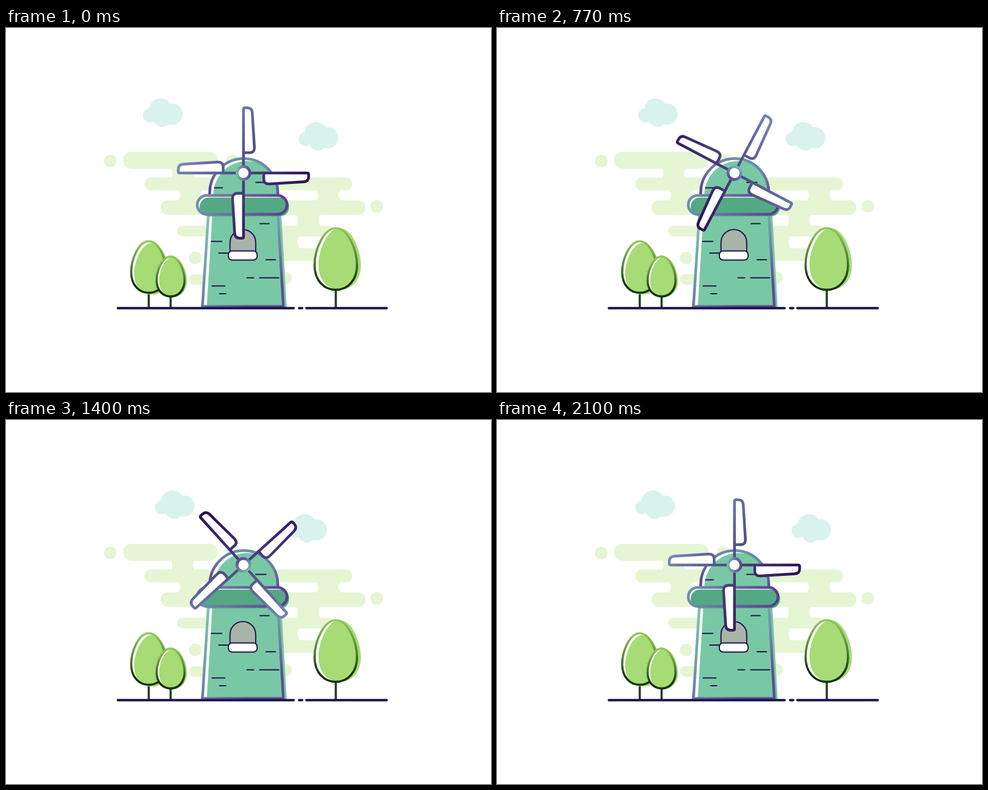
These frames come from a looping animation (800 px wide and 600 px high, 2170 ms). An HTML page:

```html
<!DOCTYPE html>
<html lang="en">
<head>
<meta charset="utf-8">
<title>Windmill</title>
<style>
  html, body { margin: 0; width: 100%; height: 100%; overflow: hidden; background: #fff; }
  svg { display: block; width: 800px; height: 600px; }
</style>
</head>
<body>
<svg viewBox="0 0 800 600" fill="none">
  <defs id="defs">
    <linearGradient id="leaf" x1="0" y1="0" x2="0" y2="1">
      <stop stop-color="#94c957"/><stop offset=".5" stop-color="#527d35"/><stop offset=".85" stop-color="#15330f"/>
    </linearGradient>
    <linearGradient id="wall" gradientUnits="userSpaceOnUse" x1="345" y1="300" x2="450" y2="459">
      <stop stop-color="#7cc6a8"/><stop offset=".36" stop-color="#73a3ac"/>
      <stop offset=".6" stop-color="#6c7cac"/><stop offset=".85" stop-color="#5f4a98"/>
    </linearGradient>
    <linearGradient id="arch" gradientUnits="userSpaceOnUse" x1="400" y1="214" x2="392" y2="276">
      <stop stop-color="#6f8fac"/><stop offset=".4" stop-color="#6b78a8"/><stop offset="1" stop-color="#5c4094"/>
    </linearGradient>
    <linearGradient id="rim" gradientUnits="userSpaceOnUse" x1="315" y1="284" x2="463" y2="300">
      <stop stop-color="#7190ae"/><stop offset="1" stop-color="#5c3a90"/>
    </linearGradient>
    <linearGradient id="ring" gradientUnits="userSpaceOnUse" x1="-12" y1="0" x2="12" y2="0">
      <stop stop-color="#78b6ae"/><stop offset="1" stop-color="#5e4296"/>
    </linearGradient>
    <linearGradient id="sail" gradientUnits="userSpaceOnUse" x1="-84" y1="-68" x2="72" y2="58">
      <stop stop-color="#7d95bd"/><stop offset=".5" stop-color="#4e4a82"/><stop offset="1" stop-color="#2a0d52"/>
    </linearGradient>
    <path id="dome" d="M336 278V271.500A56.200 56.200 0 0 1 448.400 271.500V278"/>
    <clipPath id="domeClip"><use href="#dome"/></clipPath>
    <path id="neck" d="M-20.500 -10Q-13.500 0 -20.500 10H20.500Q13.500 0 20.500 -10Z"/>
    <g id="cloud" fill="#daf2ee">
      <circle cx="255" cy="135" r="19"/><circle cx="274" cy="142" r="17.5"/>
      <circle cx="237.5" cy="144" r="11.5"/><circle cx="258" cy="148" r="15"/>
    </g>
  </defs>

  <!-- haze: round strokes joined by necks -->
  <g fill="#e6f5d3">
    <g stroke="#e6f5d3" stroke-linecap="round">
      <path stroke-width="28" d="M207 218H335"/>
      <path stroke-width="24" d="M267 296H581"/>
      <path stroke-width="21" d="M238.500 257H560.500M430 373.500H520M172 219h0M373 219h0M611.500 294h0M312 379h0M461 412h0"/>
      <path stroke-width="17.500" d="M291 334.700H530M310.500 414.500H400"/>
    </g>
    <use href="#neck" x="291.5" y="239.5"/>
    <use href="#neck" x="304" y="275.5"/>
    <use href="#neck" x="531.5" y="275.5"/>
    <use href="#neck" x="498.5" y="317"/>
    <path d="M440 342H484Q478 353 484 364H440Z"/>
  </g>
  <use id="cloudA" href="#cloud"/>
  <use id="cloudB" href="#cloud" y="39"/>
  <g id="trees"></g>

  <!-- dome -->
  <g clip-path="url(#domeClip)">
    <use href="#dome" fill="#fff"/>
    <use href="#dome" fill="#79c8a5" x="6" y="4"/>
  </g>
  <use href="#dome" stroke="url(#arch)" stroke-width="4.500"/>

  <!-- tower -->
  <path fill="#fff" d="M334 305L324 459H457L448 305Z"/>
  <path fill="#79c8a5" d="M340.500 305L331 461H463L454 305Z"/>
  <path stroke="url(#wall)" stroke-width="4.500" d="M334 305L324 459H457.500L448.500 305"/>

  <!-- rim -->
  <rect x="315.5" y="276" width="148" height="31" rx="15.5" fill="#fff"/>
  <rect x="319.5" y="279.5" width="147.5" height="31" rx="15" fill="#54a984"/>
  <rect x="315.5" y="276" width="148" height="31" rx="15.5" stroke="url(#rim)" stroke-width="4.600"/>

  <!-- window, bricks, ground -->
  <g stroke="#1f174f" stroke-width="2" stroke-linecap="round">
    <path fill="#a9b4a9" d="M369.500 370V353.500A21.200 21.200 0 0 1 411.900 353.500V370"/>
    <path d="M344 263.500h13M412 254.500h17M419 322.500h15M339 351.700h17M351 371h16M429 382h15.500M397.500 411.700h11M418.500 411.700h31.500M340 425.200h21M352.500 438h10"/>
    <rect x="366.8" y="367.5" width="47.4" height="15" rx="6" fill="#fff"/>
    <path stroke="#1c1548" stroke-width="4" d="M184.500 461.700H474.500M483.500 461.700H488.500M495.500 461.700H628"/>
  </g>

  <g id="mill"></g>
</svg>
<script>
const $ = id => document.getElementById(id);

// Egg-shaped tree: centre, top, half width, height, and shift of the leaf colour
function tree(x, y, w, h, dx, dy) {
  const half = s => `M0 0C${.56 * s} 0 ${s} ${.34 * h} ${s} ${.6 * h}C${s} ${.84 * h} ${.58 * s} ${h} 0 ${h}`;
  const egg = half(w) + half(-w);
  return `<g transform="translate(${x} ${y})">
    <path d="M0 ${h}V${460 - y}" stroke="#23401b" stroke-width="3.6"/>
    <path d="${egg}" fill="#fff"/>
    <path d="${egg}" fill="#a6db75" transform="translate(${dx} ${dy})"/>
    <path d="${egg}" stroke="url(#leaf)" stroke-width="3.6"/></g>`;
}
$('trees').innerHTML = tree(235.5, 351.5, 29, 85, 5, 3) +
  tree(271.5, 376.5, 23, 66, 4, 1) + tree(544, 330, 35, 101.5, 6.5, 0);

// Sails share one gradient across the whole wheel, so each undoes its own turn
const sails = [0, 90, 180, 270];
$('defs').insertAdjacentHTML('beforeend', sails.map(a =>
  `<linearGradient id="sail${a}" href="#sail" gradientTransform="rotate(${-a})"/>`).join(''));
$('mill').innerHTML = sails.map(a =>
  `<path transform="rotate(${a})" fill="#fff" stroke="url(#sail${a})" stroke-width="4.5" stroke-linejoin="round"
    d="M0 0V-105Q0 -107.5 2.5 -107.5H6Q14 -107.5 14.5 -99.5L18 -43Q18.5 -33.5 10 -33.5H0"/>`).join('') +
  '<circle r="10.6" fill="#fff" stroke="url(#ring)" stroke-width="4.6"/>';

const LOOP = 2170, STEP = 70, TURN = LOOP - STEP;
const REST = 440, PEAK = 1465;
const ramp = (t, from, to) => Math.min(1, Math.max(0, (t - from) / (to - from)));

function draw(now) {
  const t = Math.floor(now % LOOP / STEP) * STEP;
  const u = t / TURN;
  // One full turn that lags a little behind steady speed midway
  const angle = 360 * u - 14.8 * Math.sin(Math.PI * u ** .9);
  $('mill').setAttribute('transform', `translate(391.7 239) rotate(${angle})`);
  // The clouds rest, drift towards each other, then part
  const near = ramp(t, REST, PEAK), apart = ramp(t, PEAK, TURN);
  $('cloudA').setAttribute('x', 20.8 * near - 18.8 * apart);
  $('cloudB').setAttribute('x', 256.5 - 19.9 * near + 22.9 * apart);
}
const start = performance.now();
function tick() {
  draw(performance.now() - start);
  requestAnimationFrame(tick);
}
tick();
</script>
</body>
</html>
```
